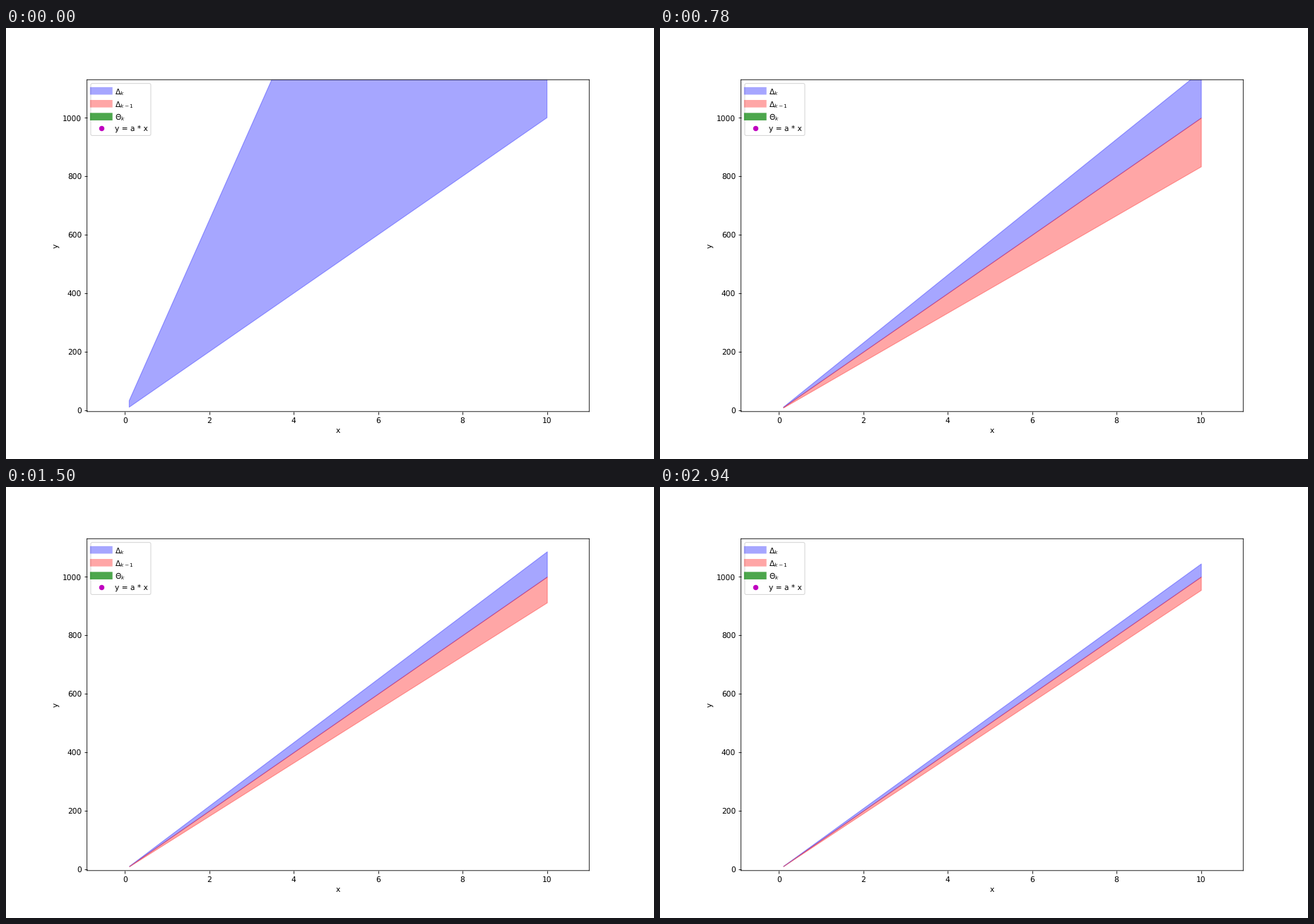
Write a matplotlib script that moves like this. It is 917 px wide and 611 px high and loops after 2.97 s.

```python
import numpy as np
import matplotlib.pyplot as plt
from matplotlib.animation import FuncAnimation
from matplotlib.collections import PolyCollection
from matplotlib.lines import Line2D

W, H, DPI = 917, 611, 76.4
FRAMES, INTERVAL = 99, 30
SLOPE, ERROR, STEP = 100, 45, 0.1
X0, X1 = 0.1, 10

# smooth, unsnapped rendering keeps sub-pixel positions and text metrics
plt.rcParams.update({"font.family": "DejaVu Sans",
                     "text.hinting": "none",
                     "path.snap": False})

# the tiny surplus guards against truncation to one pixel less
fig, ax = plt.subplots(figsize=((W + 0.01) / DPI, (H + 0.01) / DPI), dpi=DPI)
ax.set(xlim=(-0.9, 11), ylim=(-5, 1130), xlabel="x", ylabel="y")


def add_wedge(color):
    wedge = PolyCollection([], facecolor=color, edgecolor=color,
                           alpha=0.35, linewidth=1)
    ax.add_collection(wedge, autolim=False)
    return wedge


def sector(low, high):
    """Region between two lines through the origin, from X0 to X1."""
    return np.array([(X0, low * X0), (X1, low * X1),
                     (X1, high * X1), (X0, high * X0)])


def spread(k):
    """Slope uncertainty after measurement k."""
    return ERROR / (STEP * (k + 2))


def band(color, alpha):
    return Line2D([], [], color=color, alpha=alpha, lw=10)


current, previous = add_wedge("b"), add_wedge("r")

ax.legend(
    [band("b", 0.35), band("r", 0.35), band("g", 0.7),
     Line2D([], [], color="m", marker="o", ls="")],
    [r"$\Delta_k$", r"$\Delta_{k-1}$", r"$\Theta_k$", "y = a * x"],
    loc="upper left", labelspacing=0.41)


def update(k):
    current.set_verts([sector(SLOPE, SLOPE + spread(k))])
    previous.set_verts([sector(SLOPE - spread(k - 1), SLOPE)] if k else [])
    return current, previous


anim = FuncAnimation(fig, update, frames=FRAMES, init_func=lambda: update(0),
                     interval=INTERVAL, repeat=True, repeat_delay=0)
plt.show()
```
